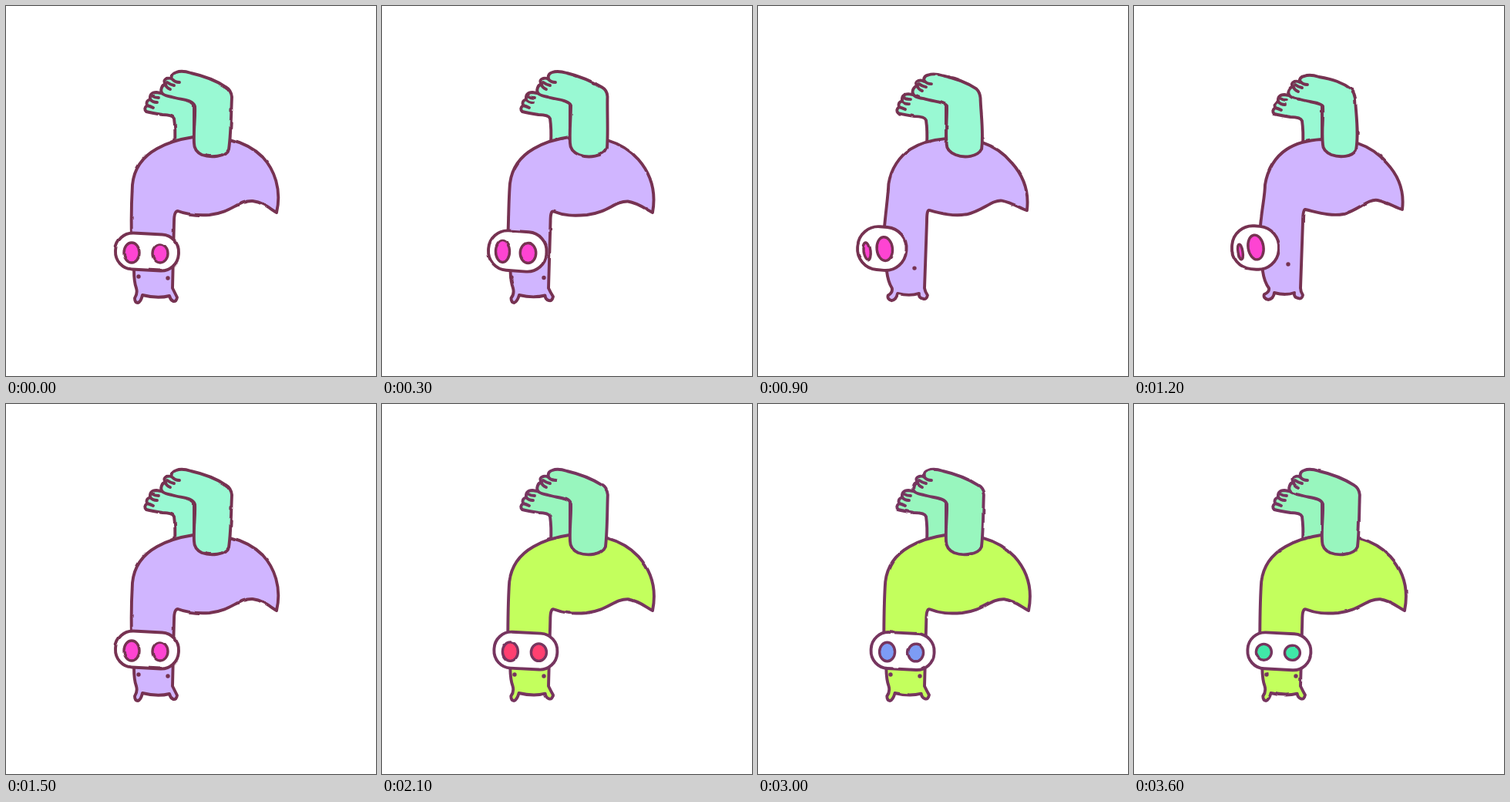
An HTML page for the animation above (3900 ms loop, 480x480 px).

```html
<!DOCTYPE html>
<html>
<head>
<meta charset="utf-8">
<style>
  html, body { margin: 0; height: 100%; overflow: hidden; background: #fff; }
  svg { display: block; width: 100%; height: 100%; }
</style>
</head>
<body>
<svg viewBox="0 0 480 480">
  <filter id="rough" filterUnits="userSpaceOnUse" x="0" y="0" width="480" height="480" color-interpolation-filters="sRGB">
    <feTurbulence id="noise" type="fractalNoise" baseFrequency=".06" numOctaves="1"/>
    <feDisplacementMap in="SourceGraphic" scale="2.4" xChannelSelector="R" yChannelSelector="G"/>
  </filter>
  <g id="creature" filter="url(#rough)" stroke-width="3.9" stroke-linejoin="round" stroke-linecap="round"></g>
</svg>
<script>
// Each part has three key poses: head to the front, half turned, fully turned.
const body = [
  `M166 342 L163 300 C162 270 163 250 164 232 C166 211 178 195 196 185 C210 177 230 172 243 170
   L290 173 C306 177 321 184 333 196 C348 212 358 238 351 268 C342 263 335 255 320 253
   C301 252 293 268 264 271 C247 272 236 271 223 266 Q218 266 218 280 L216 366
   Q219 372 222 378 Q221 384 217 383 Q213 381 212 376 Q197 380 177 375
   Q175 384 171 385 Q167 385 167 379 Q171 373 169 366 Q166 358 166 342Z`,
  `M167 344 L164 290 C167 262 166 245 168 228 C171 209 183 194 198 185 C211 177 228 172 243 170
   L294 175 C308 180 321 188 332 202 C345 218 355 236 351 268 C342 264 330 256 318 254
   C303 254 293 268 268 271 C250 273 236 273 222 267 Q219 264 219 280 L216 366
   Q218 371 222 376 Q220 383 216 381 Q211 381 211 375 Q196 379 179 375
   Q176 383 172 385 Q168 384 168 379 Q173 374 171 366 Q168 358 167 344Z`,
  `M167 344 L164 285 C166 262 170 245 170 232 C173 212 184 195 198 186 C210 178 228 174 243 173
   L290 178 C305 183 318 192 328 204 C343 220 351 240 348 264 C338 261 330 255 316 252
   C304 250 292 264 272 270 C255 273 240 268 222 264 Q219 264 219 280 L216 366
   Q216 370 219 375 Q218 381 213 379 Q207 378 208 372 Q197 376 182 372
   Q181 380 174 381 Q167 379 169 374 Q176 371 175 366 Q169 358 167 344Z`
];
const frontLeg = [
  `M244 178 C243 160 246 145 245 130 C242 121 228 122 215 118 C205 116 199 114 202 106
   Q203 102 207 102 Q203 96 209 94 Q213 93 216 95 Q214 88 221 86 Q228 83 240 87
   C258 91 273 97 285 105 Q292 109 293 118 C292 140 292 165 289 186 C285 196 265 197 254 193 Q244 188 244 178Z`,
  `M244 178 C243 160 244 145 245 128 C242 123 228 122 215 118 C205 116 199 114 202 106
   Q203 102 207 102 Q203 96 209 94 Q213 93 216 95 Q215 88 221 86 Q228 84 240 87
   C258 92 272 99 286 106 Q292 109 292 117 C292 140 295 160 295 182 C290 195 270 199 257 193 Q244 188 244 178Z`,
  `M245 180 C243 162 246 147 245 130 C242 125 228 125 215 121 C204 120 198 116 201 109
   Q203 105 206 105 Q203 100 208 98 Q212 97 215 99 Q214 92 221 91 Q228 88 240 92
   C258 95 270 99 282 108 Q286 113 287 120 C288 142 292 165 288 187 C283 196 267 197 256 193 Q245 188 245 180Z`
];
const backLeg = 'M219 178 Q220 160 218 146 Q216 141 203 141 Q190 139 182 137 Q178 133 183 129 Q181 123 187 121 Q186 112 195 112 Q215 115 244 123 V176Z';
const backToes = 'M183 129 Q187 130 191 132 M187 121 Q190 125 196 125 M190 117 Q193 119 198 119';
const frontToes = 'M207 102 Q208 106 213 108 M209 99 Q213 102 218 103 M216 95 Q219 99 225 99';

// muzzle x y w h tilt | nostrils x y rx ry | eyes x y
const face = [
  '183 319 82 47 3  163 320 10 13  200 321 10 12  172 351 210 353',
  '168.5 317 69 56 5  150 317 8 15  179 320 10.5 14  164 353 210 352',
  '157.5 313.5 61 56 5  138 319 3 10  158 313 10 16  160 325 200 335'
];

const purple = { skin: '#d0b5ff', legs: '#99f9d3', line: '#763251' };
const green = { skin: '#c3ff5d', legs: '#98f6be', line: '#76355f' };
const front = { at: 0, turn: 0, pupil: '#fe44d2', ...purple };
const poses = [
  front,
  { ...front, at: 300, turn: .5 },
  { ...front, at: 600, turn: 1 },
  { ...front, at: 900, turn: 1.7 },
  { ...front, at: 1200, turn: 2 },
  { ...front, at: 1500 },
  ...['#ff4070', '#f85ccb', '#cdb4f9', '#7d9cf5', '#45cbe8', '#40e8a8'].map((pupil, i) => ({
    at: 2100 + i * 300, turn: 0, shift: 3.4 + i * .4, lean: .3,
    squash: [.94, .97, 1, .94, .88, .8][i], pupil, ...green
  }))
];

// Blends the numbers of neighbouring key poses.
function blend(keys, k) {
  const i = Math.min(Math.floor(k), keys.length - 2), f = k - i;
  const next = keys[i + 1].match(/[\d.]+/g);
  let n = 0;
  return keys[i].replace(/[\d.]+/g, a => +a + (next[n++] - a) * f);
}

const ellipse = (x, y, rx, ry, fill, extra = '') =>
  `<ellipse cx="${x}" cy="${y}" rx="${rx}" ry="${ry}" fill="${fill}" ${extra}/>`;

function draw({ turn, shift = 0, lean = 0, squash = 1, pupil, skin, legs, line }) {
  const path = (d, fill) => `<path d="${d}" fill="${fill}"/>`;
  const [x, y, w, h, tilt, ax, ay, arx, ary, bx, by, brx, bry, ...eyes] =
    blend(face, turn).trim().split(/\s+/).map(Number);
  const drop = Math.max(0, turn - 1) * 3;
  const eye = (ex, ey) => ellipse(ex, ey, 1.4, 1.4, line, 'stroke-width="2.6"');
  const nostril = (nx, ny, rx, ry) => ellipse(nx, ny, rx, ry * squash, pupil,
    `stroke-width="3.4" transform="rotate(${turn > 1 ? -9 * (turn - 1) : 0} ${nx} ${ny})"`);
  creature.setAttribute('stroke', line);
  creature.innerHTML =
    `<g transform="translate(0 ${drop})">${path(backLeg, legs)}${path(backToes, 'none')}</g>` +
    path(blend(body, turn + lean), skin) +
    path(blend(frontLeg, turn + lean / 2), legs) +
    `<g transform="translate(0 ${drop})">${path(frontToes, 'none')}</g>` +
    eye(eyes[0], eyes[1]) + eye(eyes[2], eyes[3]) +
    `<g transform="translate(${shift} ${shift / 3})">
      <rect x="${x - w / 2}" y="${y - h / 2}" width="${w}" height="${h}" rx="${Math.min(w, h) / 2 - 1}"
        fill="#fff" transform="rotate(${tilt} ${x} ${y})"/>` +
    nostril(ax, ay, arx, ary) + nostril(bx, by, brx, bry) + '</g>';
}

const creature = document.getElementById('creature');
const noise = document.getElementById('noise');
let shown;
function tick() {
  const time = performance.now() % 3900;
  const pose = poses.findLast(p => p.at <= time);
  if (pose !== shown) {
    shown = pose;
    noise.setAttribute('seed', pose.at === 1500 ? 1 : 1 + pose.at / 300);
    draw(pose);
  }
  requestAnimationFrame(tick);
}
tick();
</script>
</body>
</html>
```
